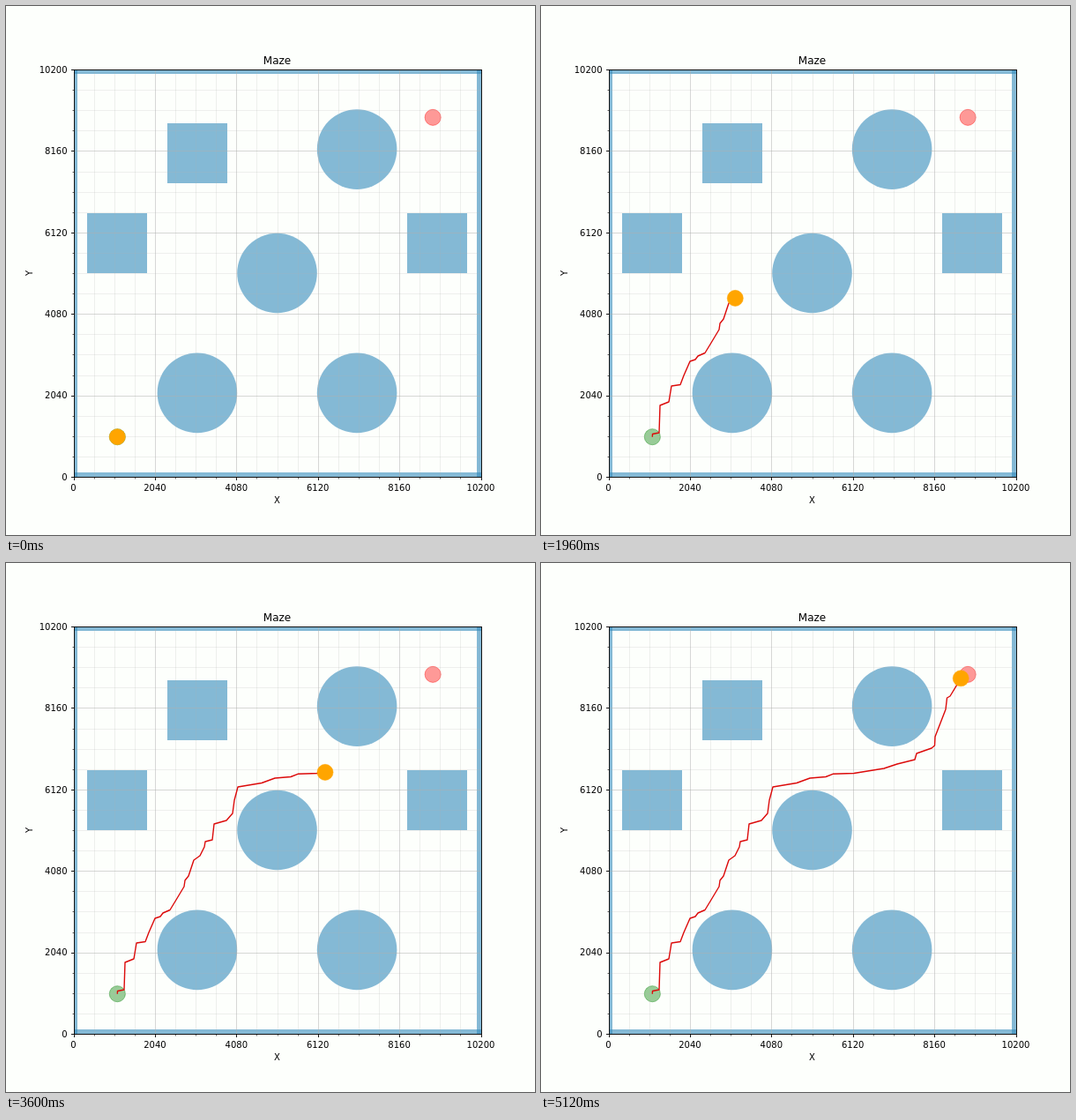
These frames come from a looping animation (600 px wide and 600 px high, 5.16 s). An HTML page:

```html
<!DOCTYPE html>
<html lang="en">
<head>
<meta charset="utf-8">
<title>Maze</title>
<style>
  html, body { margin: 0; width: 100%; height: 100%; overflow: hidden; background: #fdfffc; }
  svg { display: block; width: 600px; height: 600px; }
  text { font: 10px "DejaVu Sans", sans-serif; fill: #000; text-anchor: middle; }
  .title { font-size: 12px; }
  .end { text-anchor: end; }
  .block { fill: #348abd; fill-opacity: .6; }
  .minor { stroke: #b0b0b0; stroke-opacity: .2; }
  .major { stroke: #b0b0b0; stroke-opacity: .5; }
  .axis { stroke: #000; stroke-width: .9; fill: none; }
  .fine { stroke: #000; stroke-width: .6; }
  .spot { fill-opacity: .4; stroke-opacity: .4; }
  .start { fill: green; stroke: green; }
  .goal { fill: red; stroke: red; }
  .agent { fill: #ffa500; stroke: #ffa500; stroke-opacity: .5; }
  .trail { fill: none; stroke: #dc0a0a; stroke-width: 1.4; stroke-linejoin: round; }
</style>
</head>
<body>
<svg viewBox="0 0 600 600">
  <g id="blocks" class="block"></g>
  <g id="spots" class="spot"></g>
  <g id="grid"></g>
  <path id="trail" class="trail" d="M126.3,488.7 126.5,485.5 134,484 135,453 145,449 148,431
    158,429.5 162,419 169,403 175,401 178,397 186,393.5 193,382 202,367 203,360 207,355
    213,337 220,332 225,322 226,316 234,314 236,296 250,292 257,284 259,269 263,254
    290,249.5 305,244 323,242.5 331,239.3 355,238.5 389,233 404,228 424,223 426,216
    443,210 446.5,207 447,197 459,166 460.5,153 464,151 476.2,130.8"/>
  <g id="axes"></g>
  <text class="title" x="307.5" y="66">Maze</text>
  <text x="307.5" y="564">X</text>
  <text transform="translate(29.5 303) rotate(-90)">Y</text>
  <circle id="agent" class="agent" r="9.06"/>
</svg>
<script>
const SIZE = 10200, SPAN = 462, LEFT = 76.5, BOTTOM = 534;
const FRAME = 40, LOOP = 5160;
const $ = id => document.getElementById(id);
const len = v => v * SPAN / SIZE;
const px = x => LEFT + len(x);
const py = y => BOTTOM - len(y);
const snap = v => Math.round(v) + .5;

function add(parent, tag, attrs, text) {
  const el = document.createElementNS("http://www.w3.org/2000/svg", tag);
  for (const k in attrs) el.setAttribute(k, attrs[k]);
  if (text !== undefined) el.textContent = text;
  $(parent).append(el);
}
const line = (parent, cls, x1, y1, x2, y2) =>
  add(parent, "line", { class: cls, x1, y1, x2, y2 });
const disc = (parent, x, y, r, cls = "") =>
  add(parent, "circle", { class: cls, cx: px(x), cy: py(y), r: len(r) });

// Rectangles sit on whole pixels
function rect(x, y, w, h) {
  const [l, r, t, b] = [px(x), px(x + w), py(y + h), py(y)].map(Math.round);
  add("blocks", "rect", { x: l, y: t, width: r - l, height: b - t });
}

// Walls and obstacles
for (const edge of [0, SIZE - 100]) {
  rect(edge, 0, 100, SIZE);
  rect(0, edge, SIZE, 100);
}
for (const [x, y] of [[350, 5100], [2350, 7350], [8350, 5100]]) rect(x, y, 1500, 1500);
for (const [x, y] of [[3100, 2100], [7100, 2100], [5100, 5100], [7100, 8200]])
  disc("blocks", x, y, 1000);

disc("spots", 1100, 1000, 200, "start");
disc("spots", 9000, 9000, 200, "goal");

// Grid, ticks and labels
const x0 = snap(LEFT), x1 = snap(LEFT + SPAN), y0 = snap(BOTTOM), y1 = snap(BOTTOM - SPAN);
for (let i = 0; i <= 20; i++) {
  const major = i % 4 === 0, v = i * SIZE / 20;
  const x = snap(px(v)), y = snap(py(v));
  const cls = major ? "major" : "minor", mark = major ? "axis" : "fine";
  const size = major ? 3.5 : 2;
  line("grid", cls, x, y1, x, y0);
  line("grid", cls, x0, y, x1, y);
  line("axes", mark, x, y0, x, y0 + size);
  line("axes", mark, x0 - size, y, x0, y);
  if (major) {
    add("axes", "text", { x: px(v), y: 550 }, v);
    add("axes", "text", { class: "end", x: 69.5, y: Math.round(py(v) + 3.8) }, v);
  }
}
add("axes", "rect", { class: "axis", x: x0, y: y1, width: x1 - x0, height: y0 - y1 });

// Pace: share of the route covered by each step
const pace = [[0, 0], [12, .122], [49, .349], [70, .502], [79, .606], [112, .869], [126, .956], [128, 1]];

function shareAt(step) {
  const i = Math.max(1, pace.findIndex(([s]) => s >= step));
  const [[s0, p0], [s1, p1]] = [pace[i - 1], pace[i]];
  return p0 + (p1 - p0) * (step - s0) / (s1 - s0);
}

const trail = $("trail"), agent = $("agent");
const total = trail.getTotalLength();

function draw(time) {
  const done = total * shareAt(Math.floor((time % LOOP) / FRAME));
  const { x, y } = trail.getPointAtLength(done);
  trail.setAttribute("stroke-dasharray", `${done} ${total + 1}`);
  agent.setAttribute("cx", x);
  agent.setAttribute("cy", y);
}

let origin;
function tick(now) {
  origin ??= now;
  draw(now - origin);
  requestAnimationFrame(tick);
}
draw(0);
requestAnimationFrame(tick);
</script>
</body>
</html>
```
